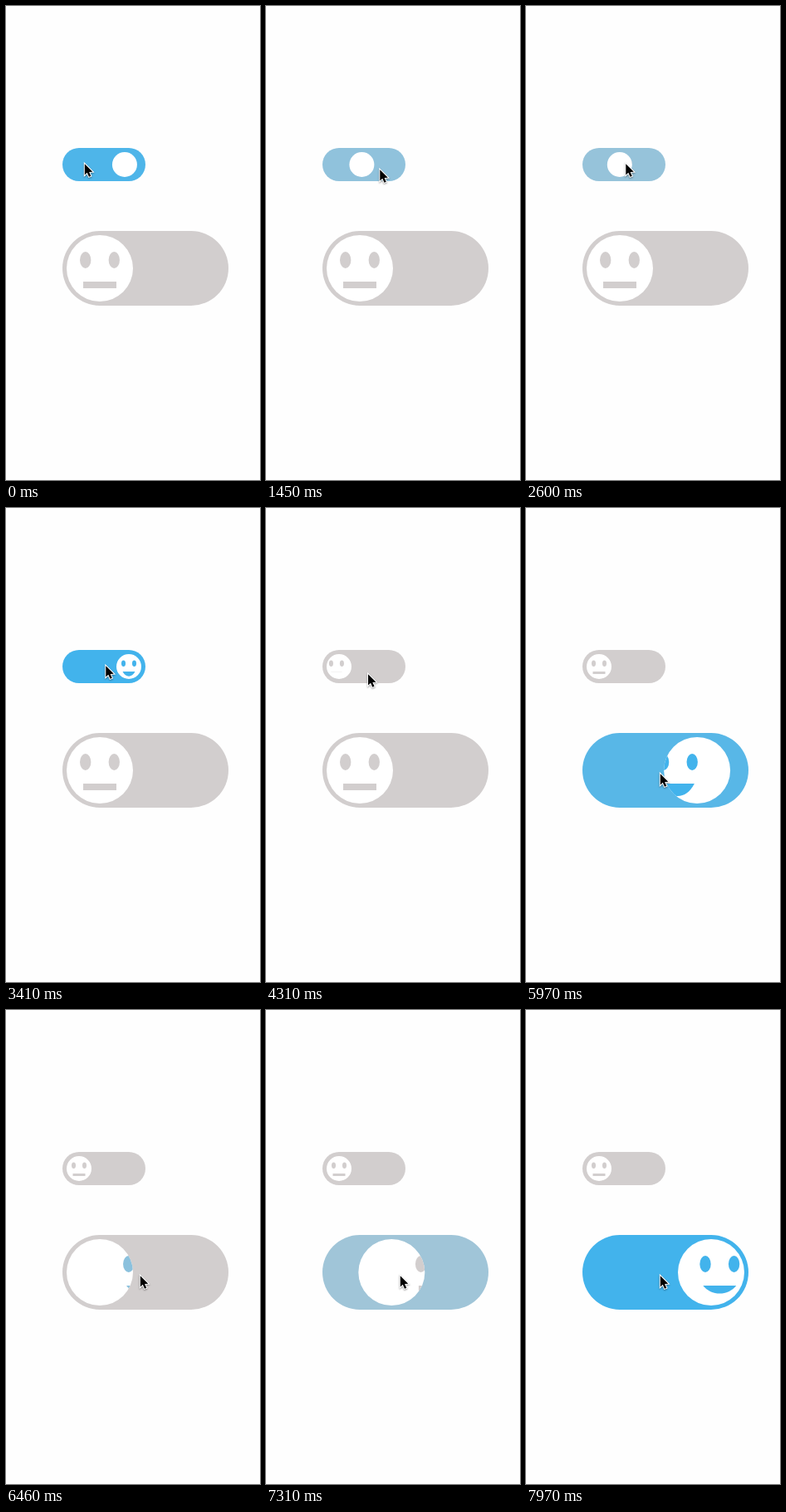
These frames come from a looping animation (306x571 px, 8 s). An HTML page with a canvas:

```html
<!DOCTYPE html>
<html lang="en">
<head>
<meta charset="utf-8">
<title>Face switches</title>
<style>
  html, body { margin: 0; width: 100%; height: 100%; overflow: hidden; background: #fefefe; }
  canvas { display: block; width: 306px; height: 571px; }
</style>
</head>
<body>
<canvas></canvas>
<script>
const LOOP = 8000, WIDTH = 306, HEIGHT = 571;
const OFF = [210, 206, 206], ON = [66, 179, 236];

// Toggles: [start ms, switched on]
const switches = [
  { x: 68, y: 171, w: 100, h: 40, toggles: [[-412, true], [1210, false], [2420, true], [3620, false]] },
  { x: 68, y: 271, w: 200, h: 90, toggles: [[-LOOP, false], [4750, true], [5910, false], [7160, true]] }
];

// Pointer stops: [ms, x, y]
const pointerPath = [
  [30, 94, 189], [450, 136.5, 196], [1940, 136.5, 196], [2150, 119.5, 189],
  [4260, 119.5, 189], [4310, 122, 198], [4420, 150, 308], [4510, 161, 319]
];
const arrow = [[0, 0], [0, 13.4], [3, 10.6], [5.2, 15.6], [7.5, 14.6], [5.3, 9.7], [9.5, 9.5]];

const canvas = document.querySelector('canvas');
const ctx = canvas.getContext('2d');
const ratio = window.devicePixelRatio || 1;
canvas.width = WIDTH * ratio;
canvas.height = HEIGHT * ratio;

const clamp = v => Math.min(1, Math.max(0, v));
const progress = (t, from, to) => clamp((t - from) / (to - from));
const lerp = (a, b, k) => a + (b - a) * k;
const mix = k => `rgb(${OFF.map((c, i) => Math.round(lerp(c, ON[i], k)))})`;

// Face offset as a share of its width: slide out, come in past the centre, settle
function faceShift(t, on, enter, settle, end) {
  const dir = on ? 1 : -1;
  if (t < enter) return dir * progress(t, -10, 235);
  if (t < settle) return dir * lerp(-1, 1 / 6, progress(t, enter, settle));
  return dir * lerp(1 / 6, 0, progress(t, settle, end));
}

// The face is drawn in units where its disc has radius 40
function drawFace(t, on, enter, settle, end) {
  ctx.translate(80 * faceShift(t, on, enter, settle, end), 0);
  const changed = progress(t, 480, 620);
  ctx.fillStyle = mix(on ? changed : 1 - changed);
  for (const x of [-17.3, 17.3]) {
    ctx.beginPath();
    ctx.ellipse(x, -10, 6.67, 10, 0, 0, 2 * Math.PI);
    ctx.fill();
  }
  const flat = on ? t < enter : t >= settle;
  if (flat) {
    ctx.fillRect(-20, 16, 40, 8);
    return;
  }
  const smile = 20 * (on ? progress(t, enter, end) : 1 - progress(t, enter, settle));
  ctx.beginPath();
  ctx.moveTo(-20, 16);
  ctx.bezierCurveTo(-10, 16 + smile, 10, 16 + smile, 20, 16);
  ctx.fill();
}

function drawSwitch({ x, y, w, h, toggles }, now) {
  const [start, on] = toggles.filter(([ms]) => ms <= now).pop();
  const t = now - start;
  const moved = progress(t, -10, 452);
  const state = on ? moved : 1 - moved;
  const radius = h / 2 - 5;

  ctx.fillStyle = mix(state);
  ctx.beginPath();
  ctx.arc(x + h / 2, y + h / 2, h / 2, Math.PI / 2, Math.PI * 1.5);
  ctx.arc(x + w - h / 2, y + h / 2, h / 2, -Math.PI / 2, Math.PI / 2);
  ctx.fill();

  ctx.save();
  ctx.translate(lerp(x + h / 2, x + w - h / 2, state), y + h / 2);
  ctx.scale(radius / 40, radius / 40);
  ctx.beginPath();
  ctx.arc(0, 0, 40, 0, 2 * Math.PI);
  ctx.fillStyle = '#fff';
  ctx.fill();
  ctx.clip();
  drawFace(t, on, ...(on ? [500, 760, 985] : [486, 703, 948]));
  ctx.restore();
}

function pointerAt(now) {
  const next = pointerPath.findIndex(([ms]) => ms > now);
  if (next === 0) return pointerPath[0].slice(1);
  if (next < 0) return pointerPath[pointerPath.length - 1].slice(1);
  const [from, x0, y0] = pointerPath[next - 1];
  const [to, x1, y1] = pointerPath[next];
  const k = progress(now, from, to);
  return [lerp(x0, x1, k), lerp(y0, y1, k)];
}

function drawPointer(now) {
  const [x, y] = pointerAt(now);
  ctx.save();
  ctx.translate(x + 0.8, y + 1.2);
  ctx.beginPath();
  arrow.forEach(p => ctx.lineTo(...p));
  ctx.closePath();
  ctx.save();
  ctx.shadowColor = 'rgba(0, 0, 0, 0.4)';
  ctx.shadowBlur = 2 * ratio;
  ctx.shadowOffsetY = ratio;
  ctx.strokeStyle = '#fff';
  ctx.lineWidth = 2;
  ctx.stroke();
  ctx.restore();
  ctx.fillStyle = '#000';
  ctx.fill();
  ctx.restore();
}

function draw() {
  const now = performance.now() % LOOP;
  ctx.setTransform(ratio, 0, 0, ratio, 0, 0);
  ctx.fillStyle = '#fefefe';
  ctx.fillRect(0, 0, WIDTH, HEIGHT);
  switches.forEach(s => drawSwitch(s, now));
  drawPointer(now);
  requestAnimationFrame(draw);
}
draw();
</script>
</body>
</html>
```
